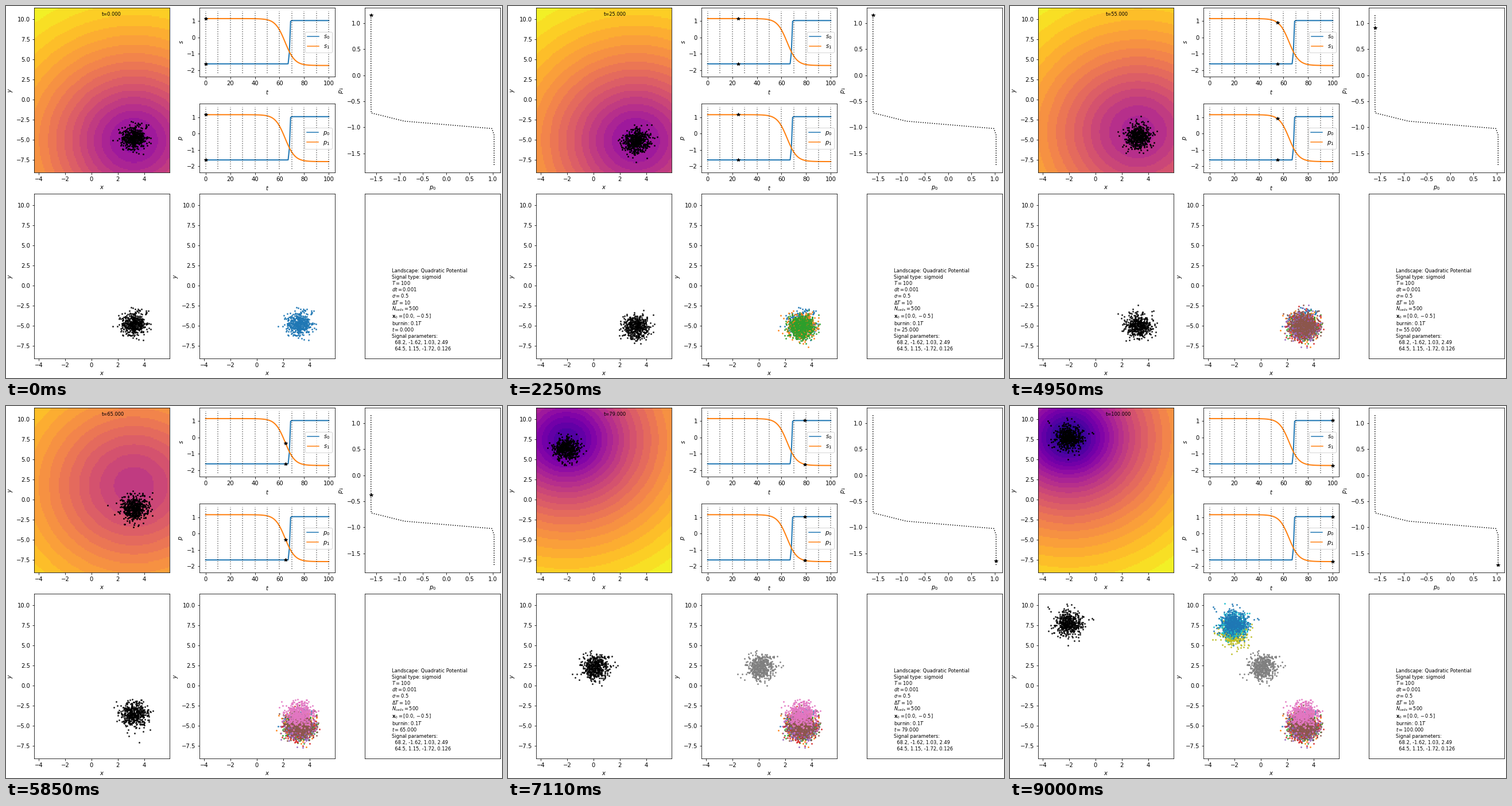
A matplotlib script for the animation above (9090 ms loop, 864 px wide and 648 px high).

```python
import matplotlib.pyplot as plt
import numpy as np
from matplotlib.animation import FuncAnimation

W, H = 864, 648
TALL, SHORT = 287, 119.6        # panel heights in pixels
N_FRAMES, N_CELLS, SNAP = 101, 500, 10
XLIM, YLIM = (-4.36, 5.93), (-9.11, 11.43)
TAU = np.array([2.0, 4.5])      # relaxation times of the two coordinates
SIGMA = 0.5
BANDS = 25
PARAMS = [(68.2, -1.62, 1.03, 2.49), (64.5, 1.15, -1.72, 0.126)]

plt.rcParams.update({"font.family": "DejaVu Sans", "font.size": 10})


def signal(t):
    """Both sigmoid signals at time t, stacked on the last axis."""
    return np.stack([a + (b - a) / 2 * (1 + np.tanh(r * (t - tc)))
                     for tc, a, b, r in PARAMS], axis=-1)


def simulate():
    """Noisy relaxation of all cells, one state per unit of time."""
    rng = np.random.default_rng(7)
    sub = 100
    p = signal(np.arange(-10, 100, 1 / sub))
    mean, means = np.array([0.0, -0.5]), []
    for q in p:
        means.append(mean)
        mean = mean - (mean / TAU + q) / sub
    means.append(mean)
    means = np.array(means)[10 * sub::sub]

    spread = SIGMA * np.sqrt(TAU / 2)
    decay = np.exp(-1 / TAU)
    kick = spread * np.sqrt(1 - decay ** 2)
    dev = rng.normal(size=(N_CELLS, 2)) * spread
    states = []
    for m in means:
        states.append(m + dev)
        dev = dev * decay + rng.normal(size=dev.shape) * kick
    return np.array(states)


times = np.arange(N_FRAMES)
sig = signal(times.astype(float))
cells = simulate()

gx, gy = np.meshgrid(np.linspace(*XLIM, 120), np.linspace(*YLIM, 140))
bowl = gx ** 2 / (2 * TAU[0]) + gy ** 2 / (2 * TAU[1])


def landscape(p):
    """Banded logarithmic level of the tilted quadratic potential."""
    phi = bowl + p[0] * gx + p[1] * gy
    level = np.log1p(np.maximum(phi + 7.8, 0)) / np.log1p(47.8)
    return (np.minimum(np.floor(level * BANDS), BANDS - 1) + 0.5) / BANDS


fig = plt.figure(figsize=(W / 72, H / 72), dpi=72, facecolor="white")


def panel(left, top, height, xlabel="", ylabel=""):
    ax = fig.add_axes([left / W, 1 - (top + height) / H, 236 / W, height / H])
    ax.set_xlabel(xlabel)
    ax.set_ylabel(ylabel)
    return ax


def plane(left, top):
    ax = panel(left, top, TALL, "$x$", "$y$")
    ax.set(xlim=XLIM, ylim=YLIM, xticks=range(-4, 5, 2),
           yticks=np.arange(-7.5, 10.1, 2.5))
    return ax


def dots(ax, color, alpha):
    return ax.plot([], [], "o", ms=3, mew=0, color=color, alpha=alpha)[0]


def star(ax):
    return ax.plot([], [], "k*", ms=6, zorder=5)[0]


def signal_panel(top, name):
    ax = panel(337, top, SHORT, "$t$", f"${name}$")
    for i in range(2):
        ax.plot(times, sig[:, i], lw=2, label=f"${name}_{i}$")
    ax.vlines(range(0, 101, SNAP), -2.19, 1.62, colors="k", linestyles=":",
              linewidth=1.5, alpha=0.6)
    ax.set(xlim=(-5, 105), ylim=(-2.387, 1.815), xticks=range(0, 101, 20),
           yticks=range(-2, 2))
    for handle in ax.legend(loc="center right").get_lines():
        handle.set_linewidth(1.5)
    return [star(ax), star(ax)]


# Landscape with the current cells
land_ax = plane(49, 3)
image = land_ax.imshow(landscape(sig[0]), extent=(*XLIM, *YLIM), cmap="plasma",
                       vmin=0, vmax=1, origin="lower", aspect="auto",
                       interpolation="nearest")
live = dots(land_ax, "k", 0.9)
clock = land_ax.text(0.5, 0.95, "", transform=land_ax.transAxes,
                     fontsize="small")

# Signals and parameters over time
time_stars = [signal_panel(3, "s"), signal_panel(3 + TALL - SHORT, "p")]

# Path in the parameter plane
path_ax = panel(625, 3, TALL, "$p_0$", "$p_1$")
path_ax.plot(sig[:, 0], sig[:, 1], "k:")
path_ax.set(xticks=np.arange(-1.5, 1.1, 0.5), yticks=np.arange(-1.5, 1.1, 0.5),
            xlim=(-1.7525, 1.1625), ylim=(-1.8635, 1.2935))
path_star = star(path_ax)

# Latest snapshot, and all snapshots so far
lower = 3 + H / 2
latest = dots(plane(49, lower), "k", 0.8)
history_ax = plane(337, lower)
history = [dots(history_ax, f"C{k % 10}", 0.85) for k in range(11)]

# Summary of the run; lines with subscripts take more room
panel(625, lower, TALL).set(xticks=[], yticks=[])
summary = ["Landscape: Quadratic Potential", "Signal type: sigmoid",
           "$T=100$", "$dt=0.001$", r"$\sigma=0.5$", r"$\Delta T=10$",
           "$N_{cells}=500$", r"$\mathbf{x}_0=[0.0, -0.5]$",
           "burnin: $0.1T$", "$t=0.000$", "Signal parameters:"]
summary += ["  " + ", ".join(f"{v:g}" for v in row) for row in PARAMS]
info = []
baseline = 464
for line in summary:
    info.append(fig.text(672.2 / W, 1 - baseline / H, line, fontsize="small"))
    baseline += 12.5 if "_" in line else 11.1
info_time = info[9]


def update(t):
    p = sig[t]
    image.set_data(landscape(p))
    live.set_data(*cells[t].T)
    clock.set_text(f"t={t:.3f}")
    info_time.set_text(f"$t={t:.3f}$")
    for pair in time_stars:
        for mark, value in zip(pair, p):
            mark.set_data([t], [value])
    path_star.set_data([p[0]], [p[1]])
    snap = t // SNAP
    latest.set_data(*cells[snap * SNAP].T)
    for k, layer in enumerate(history):
        layer.set_data(*(cells[k * SNAP].T if k <= snap else ([], [])))
    return []


anim = FuncAnimation(fig, update, frames=N_FRAMES, init_func=lambda: update(0),
                     interval=90, repeat=True, repeat_delay=0, blit=False)
plt.show()
```
